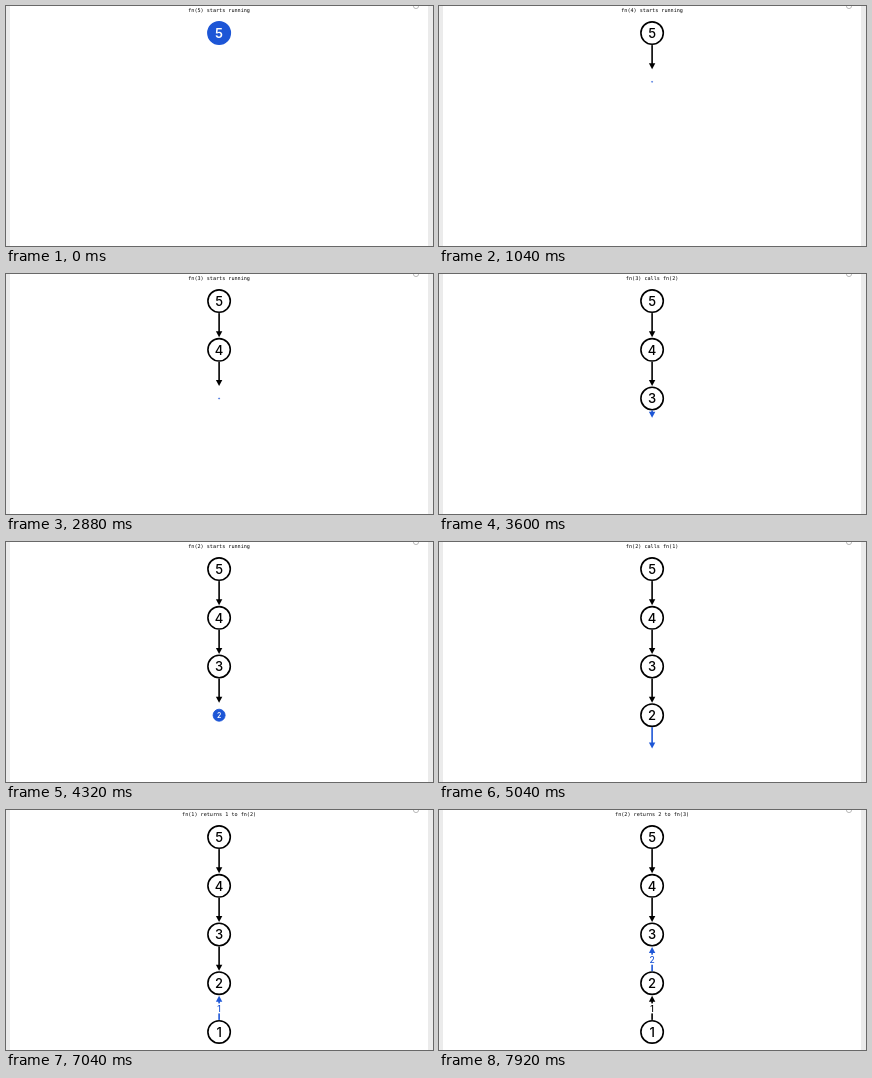
Animation of 427 by 240 pixels, one loop 8 s. Source, as an HTML page with a canvas:

```html
<!DOCTYPE html>
<html lang="en">
<head>
<meta charset="utf-8">
<title>Recursion tree</title>
<style>
  html, body { margin: 0; width: 100%; height: 100%; overflow: hidden; background: #fff; }
  canvas { display: block; width: 427px; height: 240px; }
</style>
</head>
<body>
<canvas id="stage"></canvas>
<script>
const W = 427, H = 240, LOOP = 8000;
const BLUE = '#1d56d6', BLACK = '#000';
const CX = 213.1, TOP = 27.1, GAP = 48.7;
const GROW = 300, DRAW = 240;

// Each step: start time, kind, and the calling argument it concerns.
const steps = [
  [-600, 'run', 5], [540, 'call', 5],
  [1020, 'run', 4], [1980, 'call', 4],
  [2860, 'run', 3], [3530, 'call', 3],
  [4160, 'run', 2], [4830, 'call', 2],
  [5500, 'run', 1], [6230, 'return', 1],
  [7120, 'return', 2]
].map(([start, kind, n]) => ({ start, kind, n }));

const factorial = n => n < 2 ? 1 : n * factorial(n - 1);
const captions = {
  run: n => `fn(${n}) starts running`,
  call: n => `fn(${n}) calls fn(${n - 1})`,
  return: n => `fn(${n}) returns ${factorial(n)} to fn(${n + 1})`
};

const canvas = document.getElementById('stage');
const ctx = canvas.getContext('2d');
const ratio = window.devicePixelRatio || 1;
canvas.width = W * ratio;
canvas.height = H * ratio;

const nodeY = n => TOP + (5 - n) * GAP;
const clamp = x => Math.max(0, Math.min(1, x));

function text(str, x, y, font, color) {
  ctx.font = font;
  ctx.fillStyle = color;
  ctx.textAlign = 'center';
  ctx.fillText(str, x, y);
}

function drawNode(n, age, active) {
  const p = clamp(age / GROW);
  ctx.save();
  ctx.translate(CX, nodeY(n));
  ctx.scale(p, p);
  ctx.beginPath();
  ctx.arc(0, 0, 11.2, 0, Math.PI * 2);
  ctx.fillStyle = active ? BLUE : '#fff';
  ctx.strokeStyle = active ? BLUE : BLACK;
  ctx.lineWidth = 1.6;
  ctx.fill();
  ctx.stroke();
  text(n, 0, 4.7, `${active ? 600 : 500} 13px Inter, sans-serif`, active ? '#fff' : BLACK);
  ctx.restore();
}

function drawArrow(from, dir, age, color, label) {
  const p = clamp(age / DRAW), length = 24.2 * p;
  ctx.save();
  ctx.translate(CX, nodeY(from) + dir * 12);
  ctx.fillStyle = color;
  ctx.save();
  ctx.scale(1, dir);
  ctx.fillRect(-0.8, 0, 1.6, Math.max(0, length - 5));
  ctx.beginPath();
  ctx.moveTo(-3.2, length - 6);
  ctx.lineTo(3.2, length - 6);
  ctx.lineTo(0, length);
  ctx.fill();
  ctx.restore();
  if (label && p > 0.5) {
    ctx.fillStyle = '#fff';
    ctx.fillRect(-4, dir * 11.5 - 5, 8, 10);
    text(label, 0, dir * 11.5 + 3.2, '500 8.5px Inter, sans-serif', color);
  }
  ctx.restore();
}

function drawFrame() {
  ctx.fillStyle = '#fff';
  ctx.fillRect(0, 0, W, H);
  ctx.fillStyle = '#ebebeb';
  ctx.fillRect(0, 0, 4, H);
  ctx.fillRect(422, 0, 5, H);
  ctx.beginPath();
  ctx.arc(410, 0, 2.6, 0, Math.PI * 2);
  ctx.strokeStyle = '#aaa';
  ctx.lineWidth = 0.8;
  ctx.stroke();
}

function render(t) {
  ctx.setTransform(ratio, 0, 0, ratio, 0, 0);
  drawFrame();
  const shown = steps.filter(s => s.start <= t);
  const current = shown[shown.length - 1];
  const returned = n => shown.some(s => s.kind === 'return' && s.n === n);

  for (const step of shown) {
    const { start, kind, n } = step, age = t - start;
    const color = step === current ? BLUE : BLACK;
    if (kind === 'run') drawNode(n, age, step === current);
    else if (kind === 'return') drawArrow(n, -1, age, color, factorial(n));
    else if (!returned(n - 1)) drawArrow(n, 1, age, color);
  }
  text(captions[current.kind](current.n), CX, 6.2, '5.13px "DejaVu Sans Mono", monospace', BLACK);
}

function tick() {
  render(performance.now() % LOOP);
  requestAnimationFrame(tick);
}
tick();
</script>
</body>
</html>
```
